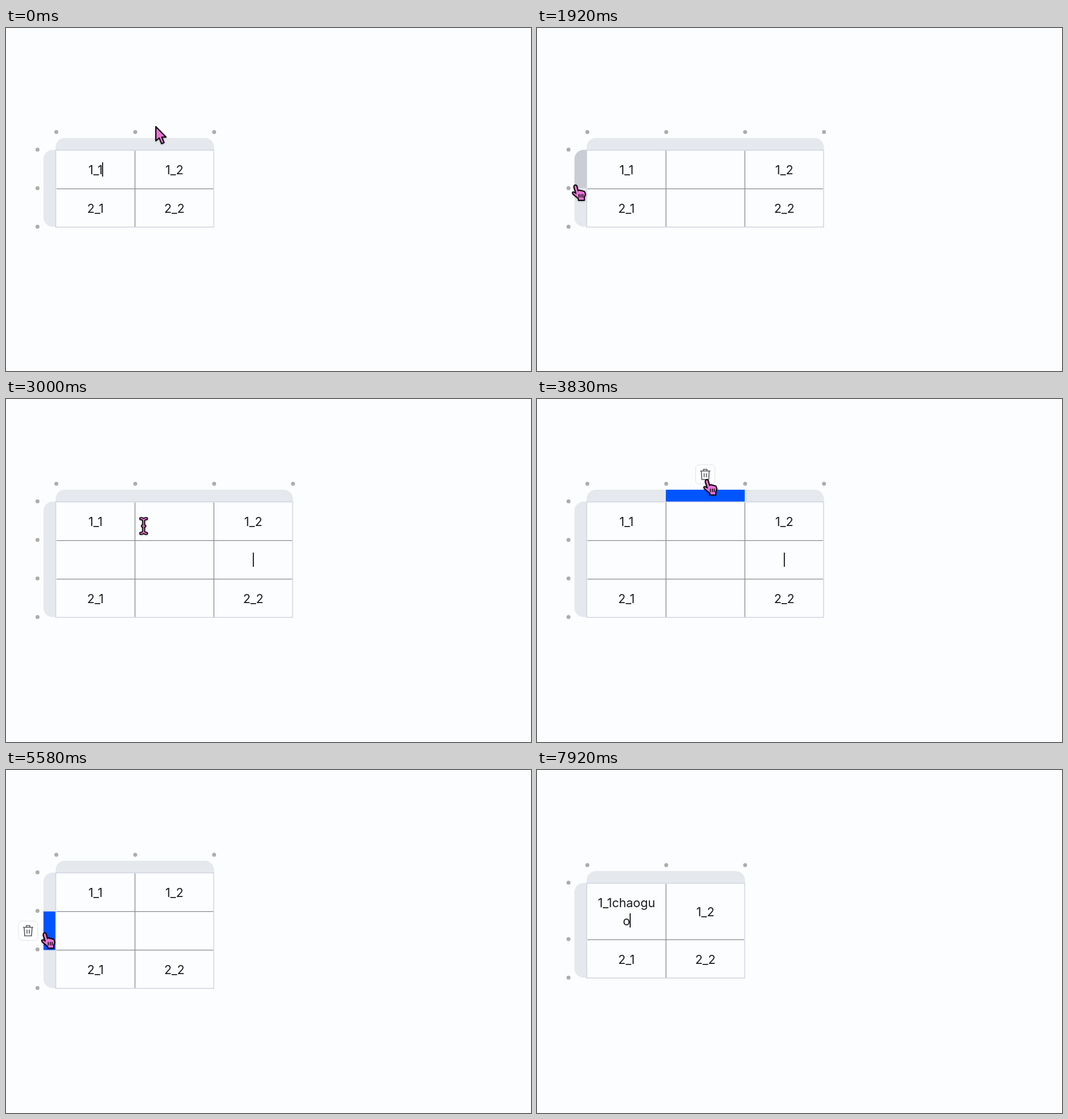
Recreate the animation shown at these times as an HTML page. Size 925 px wide and 605 px high, loop 8000 ms.

```html
<!DOCTYPE html>
<html lang="en">
<head>
<meta charset="utf-8">
<title>Table editing</title>
<style>
html, body { margin: 0; width: 100%; height: 100%; overflow: hidden; background: #fcfdff; }
svg { display: block; width: 925px; height: 605px; }
text { font: 21.5px Inter, sans-serif; fill: #18191b; text-anchor: middle; white-space: pre; }
</style>
</head>
<body>
<svg id="stage" viewBox="0 0 925 605"></svg>
<script>
const LOOP = 8000, RATE = 12;
const LEFT = 88, COL = 139, ROW = 68, MID = 283.5, LEADING = 31.5;
const GRAY = [173, 173, 173], BLUE = [0, 85, 255];
const PINK = '#e873d3', BAND = '#e5e8ed', HOVER = '#caced4', ACTIVE = '#0055ff';
const stage = document.getElementById('stage');
const pen = document.createElement('canvas').getContext('2d');

// Pointer track: tick, x, y, shape
const track = [
  [0, 264, 174, 'arrow'], [3, 246, 181, 'arrow'], [4, 246, 181, 'arrow'],
  [6, 230, 188, 'hand'], [8, 230, 191.5, 'hand'], [14, 230, 191.5, 'hand'],
  [15, 222, 225, 'resize'], [16, 222, 225, 'resize'], [17, 219, 230, 'beam'],
  [18, 218, 232, 'beam'], [19, 218, 232, 'beam'], [21, 92, 272, 'beam'], [22, 92, 272, 'beam'],
  [23, 67.5, 277, 'hand'], [27, 58, 290, 'hand'], [34, 58, 290, 'hand'],
  [35, 150, 262, 'beam'], [36, 242.5, 224, 'beam'], [38, 288, 191, 'beam'], [40, 288, 191, 'beam'],
  [41, 296, 170, 'hand'], [43, 296, 170, 'hand'], [47, 300, 133, 'hand'], [53, 300, 133, 'hand'],
  [55, 240, 222, 'beam'], [56, 240, 222, 'beam'], [57, 143.5, 296.5, 'beam'],
  [59, 80, 288, 'hand'], [66, 78, 289, 'hand'], [69, 48, 284, 'hand'], [74, 48, 284, 'hand'],
  [75, 140, 274, 'beam'], [76, 230.5, 268, 'resize'], [77, 222, 290, 'beam'],
  [80, 160, 265, 'beam'], [88, 160, 265, 'none']
];
// Growth of the insert handles: tick, amount
const colGrow = [[5, 0], [8, 1], [16, 1], [18, 0]];
const rowGrow = [[23, 0], [26, 1], [29, 1], [33, 0.06], [34, 0], [73, 0], [75, 0.6], [76, 0.16], [77, 0]];

const within = (k, a, b) => k >= a && k < b;

function along(keys, k, f = 1) {
  let i = keys.length - 1;
  while (i > 0 && keys[i][0] > k) i--;
  const a = keys[i], b = keys[i + 1];
  if (k < a[0] || !b) return a[f];
  return a[f] + (b[f] - a[f]) * (k - a[0]) / (b[0] - a[0]);
}

function textWidth(s) {
  pen.font = '21.5px Inter, sans-serif';
  return pen.measureText(s).width;
}

const path = (d, attrs) => `<path d="${d}" ${attrs}/>`;
const line = (x1, y1, x2, y2, color, w, o = 1) =>
  `<line x1="${x1}" y1="${y1}" x2="${x2}" y2="${y2}" stroke="${color}" stroke-width="${w}" opacity="${o}"/>`;
const rect = (x, y, w, h, attrs) => `<rect x="${x}" y="${y}" width="${w}" height="${h}" ${attrs}/>`;

function cells(k) {
  const gap = within(k, 12, 53), extra = within(k, 29, 73);
  const typed = k < 88 ? 0 : k < 94 ? Math.min(k - 87, 5) : k - 88;
  const word = '1_1' + 'chaoguo'.slice(0, typed);
  const first = k >= 95 ? ['1_1chaogu', 'o'] : [word];
  const wide = (a, b) => gap ? [a, [''], b] : [a, b];
  const grid = [wide(first, ['1_2']), wide(['2_1'], ['2_2'])];
  if (extra) grid.splice(1, 0, wide([''], ['']));
  return grid;
}

// Row, column of the visible text caret
function caretAt(k) {
  if (k < 3 || within(k, 8, 12) || k >= 82) return [0, 0];
  if (within(k, 12, 18) || within(k, 24, 29)) return [0, 1];
  if (within(k, 29, 37) || within(k, 42, 48)) return [1, 2];
  return null;
}

function handle(x, y, p) {
  const m = Math.min(1, p * 2), r = 3.5 + 15.5 * p, arm = 10.3 * p;
  const color = `rgb(${GRAY.map((c, i) => Math.round(c + (BLUE[i] - c) * m))})`;
  let out = `<circle cx="${x}" cy="${y}" r="${r}" fill="${color}"/>`;
  if (p > 0.25) {
    out += line(x - arm, y, x + arm, y, '#fff', 3.4 * p) + line(x, y - arm, x, y + arm, '#fff', 3.4 * p);
  }
  return out;
}

function trash(x, y) {
  return rect(x - 17, y - 17, 34, 34, 'rx="6" fill="#fff" stroke="#dfe2e8"') +
    path(`M${x - 9} ${y - 6}h18M${x - 3} ${y - 6}v-3h6v3M${x - 7} ${y - 6}l1 15h12l1-15M${x - 2} ${y - 2}v7M${x + 2} ${y - 2}v7`,
      'fill="none" stroke="#55585e" stroke-width="1.6"');
}

const shapes = {
  none: '',
  arrow: path('M0 0V25L6 20L10 30L14.5 28L10.5 18.5H18Z',
    `fill="${PINK}" stroke="#000" stroke-width="2" stroke-linejoin="round"`),
  hand: path('M-2 1Q0 -1 2.5 1L5 10Q8 8 9.5 10Q12 9 13.5 11Q16 10 17 13L18 17L16 21V27H5.5V24L-3 17Q-6 14 -4.5 12.5Q-2 11.5 1 14.5L-2.5 4Z',
    `fill="${PINK}" stroke="#000" stroke-width="2" stroke-linejoin="round"`) +
    path('M6.5 16v6M10 16v6M13.3 16v6', 'stroke="#000" stroke-width="1.5" fill="none"'),
  beam: [['#000', 5.4], [PINK, 2]].map(([c, w]) =>
    path('M-5 -13Q0 -13 0 -9Q0 -13 5 -13M0 -9V9M-5 13Q0 13 0 9Q0 13 5 13M-2 0H2',
      `fill="none" stroke="${c}" stroke-width="${w}" stroke-linecap="round" stroke-linejoin="round"`)).join(''),
  resize: path('M-14 0L-6 -8V-3H-3.5V-13H3.5V-3H6V-8L14 0L6 8V3H3.5V13H-3.5V3H-6V8Z',
    `fill="${PINK}" stroke="#000" stroke-width="2" stroke-linejoin="round"`)
};

function pointer(k) {
  let kind = 'none';
  for (const key of track) if (key[0] <= k) kind = key[3];
  const x = along(track, k, 1), y = along(track, k, 2);
  return `<g transform="translate(${x} ${y})" style="filter:drop-shadow(0 1px 1.5px rgba(0,0,0,.3))">${shapes[kind]}</g>`;
}

function draw(k) {
  const grid = cells(k), cols = grid[0].length;
  const heights = grid.map(r => ROW + (Math.max(...r.map(c => c.length)) - 1) * LEADING);
  const total = heights.reduce((a, b) => a + b);
  const top = MID - total / 2, bottom = top + total, right = LEFT + cols * COL;
  const ys = [top];
  heights.forEach(h => ys.push(ys[ys.length - 1] + h));
  let out = '';

  // Header bands
  out += path(`M${LEFT - 0.5} ${top}v-5.5a16 16 0 0 1 16 -16H${right - 15.5}a16 16 0 0 1 16 16v5.5z`, `fill="${BAND}"`);
  out += path(`M${LEFT} ${top - 0.5}h-6a16 16 0 0 0 -16 16V${bottom - 17}a16 16 0 0 0 16 16h6z`, `fill="${BAND}"`);
  if (within(k, 23, 25)) {
    out += path(`M${LEFT} ${top - 0.5}h-6a16 16 0 0 0 -16 16V${ys[1] - 1}h22z`, `fill="${HOVER}"`);
  }
  if (within(k, 41, 53)) {
    out += rect(LEFT + COL, top - 21.5, COL, 21.5, `fill="${k < 43 ? HOVER : ACTIVE}"`);
  }
  if (within(k, 59, 73)) {
    out += rect(LEFT - 22, ys[1], 22, ROW, `fill="${k < 61 ? HOVER : ACTIVE}"`);
  }

  // Grid
  out += rect(LEFT - 0.4, top, right - LEFT + 0.4, total - 0.3, 'fill="#fcfdff" stroke="#cdd2e0" stroke-width="1.4"');
  for (let c = 1; c < cols; c++) {
    out += line(LEFT + c * COL + 0.3, top + 1, LEFT + c * COL + 0.3, bottom - 1, '#88898d', 1.3);
  }
  for (let r = 1; r < grid.length; r++) out += line(LEFT + 1, ys[r] + 0.1, right - 1, ys[r] + 0.1, '#88898d', 1.3);

  // Text and caret
  const spot = caretAt(k);
  grid.forEach((row, r) => row.forEach((lines, c) => {
    const cx = LEFT + (c + 0.5) * COL + 0.2, cy = (ys[r] + ys[r + 1]) / 2;
    lines.forEach((s, i) => {
      const y = cy + (i - (lines.length - 1) / 2) * LEADING;
      if (s) out += `<text x="${cx}" y="${y + 8.5}">${s}</text>`;
      if (spot && spot[0] === r && spot[1] === c && i === lines.length - 1) {
        out += rect(cx + textWidth(s) / 2 - 0.8, y - 12.5, 1.7, 25, 'fill="#000"');
      }
    });
  }));

  // Insert handles and their guide lines
  const pc = along(colGrow, k), pr = along(rowGrow, k);
  const dotY = top - 32, dotX = 55.5, gx = LEFT + COL + 0.7, gy = ys[1] - 0.9;
  if (pc > 0) out += line(gx, dotY + 24.5, gx, bottom + 0.6, ACTIVE, 3.6, Math.min(1, pc * 2));
  if (pr > 0) out += line(dotX + 24.5, gy, right, gy, ACTIVE, 3.6, Math.min(1, pr * 1.6));
  for (let c = 0; c <= cols; c++) out += handle(LEFT + c * COL + 0.7, dotY, c === 1 ? pc : 0);
  ys.forEach((y, r) => out += handle(dotX, y - 0.9, r === 1 ? pr : 0));

  if (within(k, 43, 53)) out += trash(LEFT + 1.5 * COL, top - 48.5);
  if (within(k, 61, 73)) out += trash(LEFT - 49, ys[1] + ROW / 2);
  stage.innerHTML = out + pointer(k);
}

let shown = -1;
function frame() {
  const k = Math.floor((performance.now() % LOOP + 4) * RATE / 1000) % 96;
  if (k !== shown) draw(shown = k);
  requestAnimationFrame(frame);
}
frame();
</script>
</body>
</html>
```
